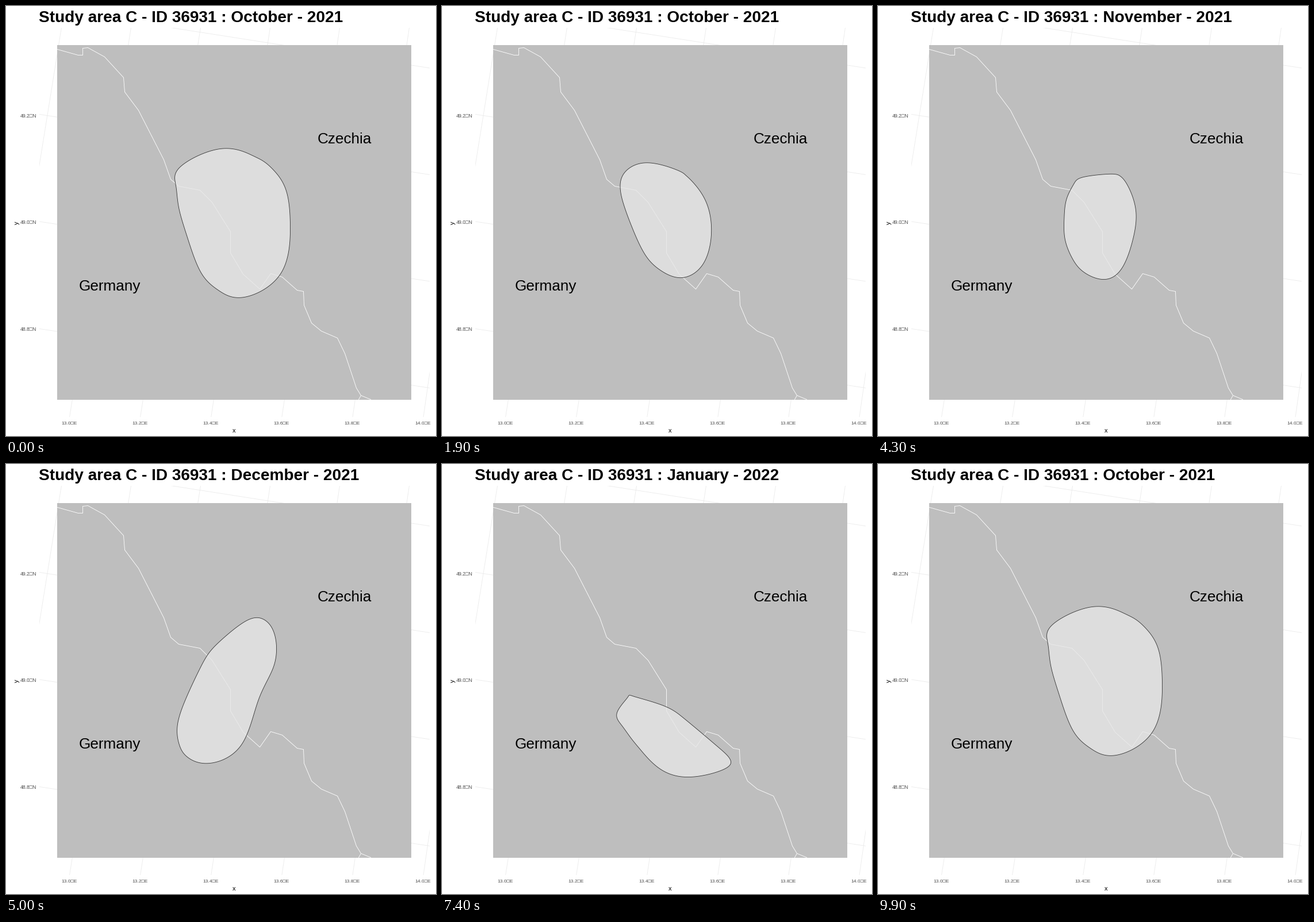
These frames come from a looping animation (748 px wide and 748 px high, 10000 ms). A matplotlib script:

```python
import numpy as np
import matplotlib.pyplot as plt
from matplotlib.animation import FuncAnimation
from matplotlib.patches import Polygon, Rectangle

SIZE, DPI = 748, 100
PX = 72 / DPI  # one pixel in points
THIN = 0.85 * PX
FRAMES, INTERVAL = 100, 100
plt.rcParams["font.family"] = "Liberation Sans"

# Home range per month: matching landmarks, clockwise from the top
OCTOBER = [(372, 248), (427, 259), (448, 270), (465, 285), (486, 318),
           (494, 380), (478, 464), (414, 506), (369, 494), (338, 462),
           (315, 402), (300, 350), (295, 312), (303, 279)]
NOVEMBER = [(342, 293), (390, 306), (402, 314), (411, 324), (435, 358),
            (446, 402), (434, 433), (420, 443), (388, 429), (364, 404),
            (344, 372), (330, 344), (322, 319), (331, 296)]
DECEMBER = [(377, 303), (418, 272), (448, 270), (467, 297), (466, 349),
            (439, 409), (409, 488), (354, 520), (316, 510), (301, 488),
            (298, 452), (314, 404), (335, 359), (352, 329)]
JANUARY = [(334, 404), (385, 420), (418, 440), (447, 464), (480, 492),
           (500, 512), (491, 530), (431, 544), (379, 530), (346, 498),
           (328, 476), (312, 454), (304, 432), (322, 406)]
SHAPES = np.array([OCTOBER, NOVEMBER, DECEMBER, JANUARY], float)
MONTHS = ["October - 2021", "November - 2021", "December - 2021", "January - 2022"]

# each month rests, then moves evenly to the next one
STOPS = [0, 12, 25, 38, 50, 62, 74, 87, 99]
STAGE = [0, 0, 1, 1, 2, 2, 3, 3, 4]

BORDER = [(89, 75), (125, 85), (133, 85), (133, 73), (142, 72), (171, 88),
          (204, 124), (206, 149), (230, 181), (274, 267), (286, 301),
          (300, 313), (337, 320), (358, 341), (390, 392), (390, 429),
          (412, 466), (441, 492), (460, 465), (480, 471), (506, 494),
          (517, 496), (518, 520), (531, 551), (548, 565), (576, 577),
          (589, 604), (609, 664), (617, 677), (634, 684)]


def smooth(p, steps=24):
    """Closed cubic spline through the points p."""
    eye = np.eye(len(p))
    system = 4 * eye + np.roll(eye, 1, axis=0) + np.roll(eye, -1, axis=0)
    q = np.roll(p, -1, axis=0)
    m = np.linalg.solve(system, 3 * (q - np.roll(p, 1, axis=0)))
    n = np.roll(m, -1, axis=0)
    t = np.linspace(0, 1, steps, endpoint=False)[:, None]
    p, q, m, n = (v[:, None, :] for v in (p, q, m, n))
    curve = (p + m * t + (3 * (q - p) - 2 * m - n) * t ** 2
             + (2 * (p - q) + m + n) * t ** 3)
    return curve.reshape(-1, 2)


def state(frame):
    """Outline and title for one frame."""
    stage = np.interp(frame, STOPS, STAGE)
    i, t = int(stage), stage % 1
    shape = (1 - t) * SHAPES[i % 4] + t * SHAPES[(i + 1) % 4]
    month = MONTHS[(i + (t > 0.55)) % 4]
    return smooth(shape), "Study area C - ID 36931 : " + month


fig = plt.figure(figsize=(SIZE / 100, SIZE / 100), dpi=DPI, facecolor="white")
ax = fig.add_axes([0, 0, 1, 1])
ax.set_xlim(-0.5, SIZE - 0.5)
ax.set_ylim(SIZE - 0.5, -0.5)
ax.axis("off")


def line(points, color, z):
    x, y = zip(*points)
    return ax.plot(x, y, color=color, lw=THIN, zorder=z)[0]


def label(x, y, s, px, color="black", va="baseline", **kw):
    return ax.text(x, y, s, fontsize=px * PX, color=color, va=va, zorder=6, **kw)


# graticule, cut to the plot panel and mostly hidden by the land
panel = ax.add_patch(Rectangle((58, 37), 679, 678, fc="none", ec="none"))
for k in range(-1, 6):
    meridian = [(110 + 123.1 * k, 715), (217 + 121 * k, 37)]
    parallel = [(58, 188 + 186.5 * k), (737, 293 + 185.5 * k)]
    for grid in (meridian, parallel):
        line(grid, "#ebebeb", 1).set_clip_path(panel)

ax.add_patch(Rectangle((88.5, 67.5), 616, 617, fc="#bebebe", ec="none", zorder=2))
line(BORDER, "white", 3)
line([(617, 677), (613, 684)], "white", 3)

outline, heading = state(0)
home = ax.add_patch(Polygon(outline, closed=True, fc=(0.9, 0.9, 0.9, 0.8),
                            ec="#333333", lw=THIN, zorder=4))
title = label(57, 27.5, heading, 28, weight="bold")
label(588, 238.5, "Czechia", 26.1, ha="center")
label(179.5, 494.5, "Germany", 26.1, ha="center")

TICK = "#4d4d4d"
for k in range(3):
    label(52.5, 193 + 186 * k, f"{49.2 - 0.2 * k:.1f}\u25a1N", 8.6, TICK, ha="right")
for k in range(6):
    label(109.5 + 123 * k, 728, f"{13 + 0.2 * k:.1f}\u25a1E", 8.5, TICK, ha="center")
label(396, 741.5, "x", 11, ha="center")
label(18, 376.5, "y", 11, ha="center", va="center", rotation=90)


def update(frame):
    outline, heading = state(frame)
    home.set_xy(outline)
    title.set_text(heading)
    return home, title


anim = FuncAnimation(fig, update, frames=FRAMES, interval=INTERVAL,
                     repeat=True, repeat_delay=0, blit=False)
plt.show()
```
